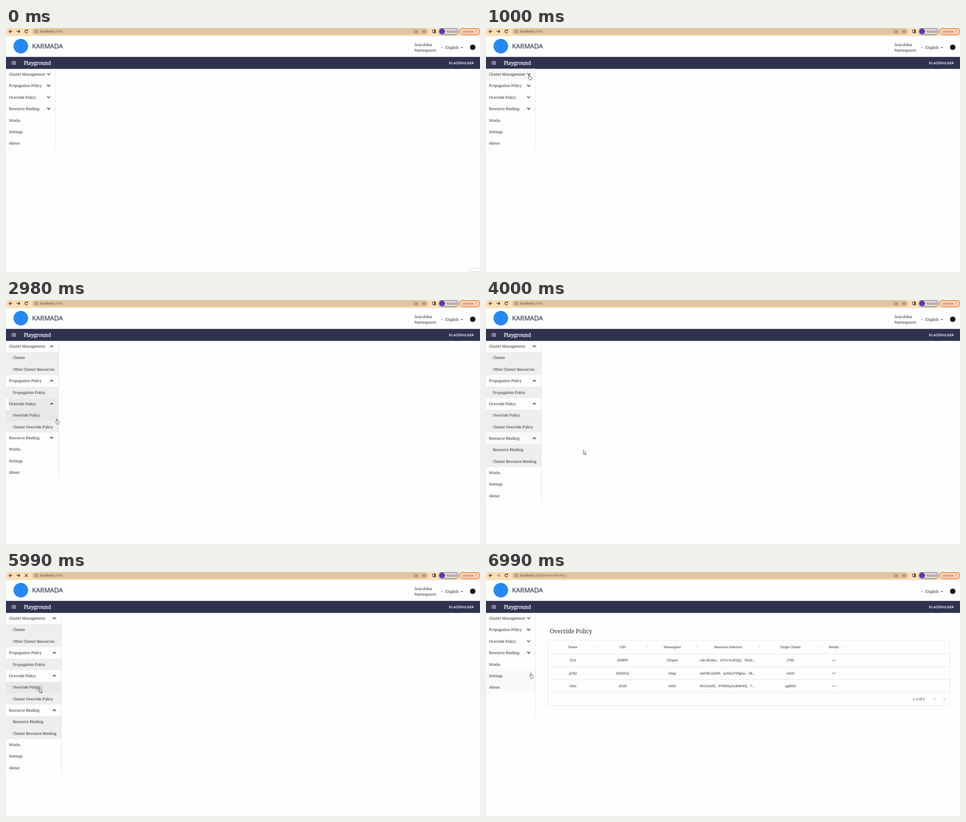
An HTML page that plays this animation: 1040 px wide and 538 px high, repeating every 7990 ms.

```html
<!DOCTYPE html>
<html lang="en">
<head>
<meta charset="utf-8">
<title>Playground</title>
<style>
  html, body { margin: 0; width: 100%; height: 100%; overflow: hidden; background: #fefefe; }
  svg { display: block; width: 1040px; height: 538px; overflow: hidden; }
  text { text-rendering: geometricPrecision; white-space: pre; }
  .slab { font-family: "Noto Serif", "Noto Sans CJK SC", "Noto Sans CJK", serif; letter-spacing: -.024em; fill: #2d3037; }
  .ui { font-family: "Open Sans", "Noto Sans", sans-serif; fill: #403a33; }
  .line { fill: none; stroke-linecap: round; stroke-linejoin: round; }
  #reel { animation: reel 7990ms step-end infinite; }
  @keyframes reel {
    0% { transform: translateY(0); }
    12.515% { transform: translateY(-600px); }
    24.78% { transform: translateY(-1200px); }
    37.296% { transform: translateY(-1800px); }
    50.062% { transform: translateY(-2400px); }
    62.452% { transform: translateY(-3000px); }
    74.968% { transform: translateY(-3600px); }
    87.484% { transform: translateY(-4200px); }
  }
</style>
</head>
<body>
<svg viewBox="0 0 1040 538" xmlns="http://www.w3.org/2000/svg">
  <!-- browser bar -->
  <rect width="1040" height="17" fill="#fedeb4"/>
  <rect y="17" width="1040" height="1" fill="#ece2d4"/>
  <rect x="57" y=".5" width="870" height="14.3" rx="7.1" fill="#dfc4a0"/>
  <g class="line" stroke="#333" stroke-width="1.3">
    <path d="M13.5 7.5H6.8M9.9 4.3 6.7 7.5 9.9 10.7"/>
    <g stroke="#5b5346" stroke-width=".8">
      <circle cx="66.5" cy="7.6" r="3.3"/>
      <path d="M66.5 7.2V9.3M66.5 5.7V5.8"/>
      <path d="M899 5.5H896.8V11H902.8V9.2M898.8 9Q899.3 6.6 902 6.5V4.7L904.2 7.2 902 9.3V7.8"/>
      <path d="M917.3 4 918.3 6.5 921 6.7 918.9 8.4 919.6 11 917.3 9.6 915 11 915.7 8.4 913.6 6.7 916.3 6.5Z"/>
    </g>
    <rect x="935.8" y="4.4" width="6.6" height="6.4" rx=".6" stroke-width="1.1"/>
    <path d="M941 5V10.5" stroke-width="2.6"/>
  </g>
  <rect x="949.5" y=".5" width="43" height="14.3" rx="7.1" fill="#e5d3c3" stroke="#4468b5"/>
  <circle cx="956.8" cy="7.5" r="6" fill="#4a2aa5"/>
  <text class="ui" x="955.6" y="10" font-size="7" style="fill:#fff">J</text>
  <text class="ui" x="967" y="9.9" font-size="6.6" style="fill:#3a57a0">Paused</text>
  <rect x="995.5" y=".5" width="44" height="14.3" rx="7.1" fill="#fbd3ad" stroke="#c25a36"/>
  <text class="ui" x="1002.5" y="9.9" font-size="6.6" style="fill:#a8401f">Update</text>
  <path d="M1032.7 4.8v.1M1032.7 7.5v.1M1032.7 10.2v.1" class="line" stroke="#b8603c" stroke-width="1.1"/>

  <!-- page header -->
  <circle cx="32.5" cy="40" r="16" fill="#2688ee"/>
  <text class="ui" x="57" y="45.4" font-size="14.3" style="fill:#2c3a58;text-shadow:1px 1px 1px #0004">KARMADA</text>
  <circle cx="957.3" cy="43.2" r="1" fill="#444"/>
  <text class="slab" x="964" y="46" font-size="8.7">English</text>
  <path d="M997 42h6l-3 3z" fill="#666"/>
  <circle cx="1024" cy="42.4" r="6" fill="#181818"/>
  <rect y="63" width="1040" height="1" fill="#c3c4cc"/>
  <rect y="64" width="1040" height="26.2" fill="#30334f"/>
  <path d="M12.3 74.4h9.8M12.3 77.2h9.8M12.3 80h9.8" stroke="#fff" stroke-width="1.1"/>
  <text class="slab" x="39" y="81.4" font-size="11.3" style="fill:#fff;stroke:#fff;stroke-width:.25">Playground</text>
  <text x="972" y="79.6" font-size="7.6" font-weight="500" fill="#fff" letter-spacing=".0286em" font-family="Roboto, sans-serif">PLACEHOLDER</text>

  <g id="reel"></g>
</svg>
<script>
const PITCH = 25.35, TOP = 89.7, GAP = 600;
const groups = [
  ["Cluster Management", "Cluster", "Other Cluster Resources"],
  ["Propagation Policy", "Propagation Policy"],
  ["Override Policy", "Override Policy", "Cluster Override Policy"],
  ["Resource Binding", "Resource Binding", "Cluster Resource Binding"],
  ["Works"], ["Settings"], ["About"]
];
const rowTop = i => TOP + PITCH * i;

const slab = (x, y, s, size = 8.4, anchor = "start") =>
  `<text class="slab" x="${x}" y="${y}" font-size="${size}" text-anchor="${anchor}">${s}</text>`;
const box = (x, y, w, h, fill) => `<rect x="${x}" y="${y}" width="${w}" height="${h}" fill="${fill}"/>`;
const line = (d, color, width = 1) => `<path class="line" d="${d}" stroke="${color}" stroke-width="${width}"/>`;

const pointer = (x, y, d) =>
  `<path transform="translate(${x} ${y})" d="${d}" fill="#fff" stroke="#2b2b2b" stroke-width=".8" stroke-linejoin="round"/>`;
const hand = (x, y) => pointer(x - 3.2, y,
  "M2.3 7.3V1.3a.9.9 0 0 1 1.8 0V5l3 .7q1.2.3 1.1 1.5v2q0 1-.7 2v1.1H3.2v-1L.6 8.3Q.2 7 1.2 6.8z");
const arrow = (x, y) => pointer(x, y, "M0 0V9.2L2.1 7.3 3.6 10.6 5 10 3.6 6.8H6.4z");

// open: number of expanded groups; tints: row index -> background; under: extra shapes behind the labels
function menu({ open = 0, width = 109, tints = {}, under = "", lag = 0, end }) {
  let back = "", front = "", row = 0;
  groups.forEach(([title, ...subs], g) => {
    const isOpen = g < open, y = () => rowTop(row) - (g >= open ? lag : 0);
    const tint = fill => { if (fill) back += box(0, y(), width, PITCH, fill); };
    tint(tints[row]);
    front += slab(6.6, y() + 15.4, title);
    if (subs.length) {
      const cx = width - 15.4, cy = y() + 12.2, k = isOpen ? -1.5 : 1.5;
      front += line(`M${cx - 2.9} ${cy - k}l2.9 ${2 * k} 2.9 ${-2 * k}`, "#222", 1.35);
    }
    row++;
    if (isOpen) for (const sub of subs) {
      tint(tints[row] || "#eee");
      front += slab(15, y() + 15.4, sub);
      row++;
    }
  });
  const bottom = end || rowTop(row) - lag - 1;
  return back + under + line(`M${width} 91V${bottom}`, "#e1e5e8") + front;
}

function bar({ path = "", loading = false, dim = false }) {
  const icon = loading
    ? "M41.7 4.8 47.3 10.4M47.3 4.8 41.7 10.4"
    : "M47.4 9.2A3.3 3.3 0 1 1 47 5.2M47.6 3.8V6H45.4";
  return line("M23.6 7.5H30.3M27.3 4.3 30.5 7.5 27.3 10.7", dim ? "#a39479" : "#333", 1.3) +
    line(icon, "#333", 1.25) +
    `<text class="ui" x="75" y="10.2" font-size="7.3">localhost<tspan fill="#6d6152">:3000${path}</tspan></text>`;
}

const links = slab(896, 40.2, "SearchBar") + slab(896, 52.3, "Namespaces");

const recordBox =
  `<rect x="1016.5" y="529.5" width="30" height="20" fill="#fff" stroke="#ddd"/>` +
  `<text class="ui" x="1020" y="540" font-size="7" style="fill:#bbb">Record</text>`;

function table() {
  const centers = [190.5, 300, 408.5, 531.5, 668, 763];
  const heads = ["Name", "UID", "Namespace", "Resource Selectors", "Target Cluster", "Details"];
  const rows = [
    ["YLIr", "KNB8Y", "ZtZquu", "c4s/cBLKar、wUrv/1uN2j2j、WaXi…", "270G"],
    ["g59Q", "IZkHE2y", "d4xp", "uM58t/c4o9H、qvkXs/FDYghn、5R…", "vAO2"],
    ["vhIn", "xFxH", "nMD", "8tO2/nhIX、FWRWqYu/R46Wlj、7…", "agBNSI"]
  ];
  const rule = "#dfe7e8", size = 7.35;
  let out = slab(140, 135.2, "Override Policy", 13.2) +
    `<rect x="136" y="150.3" width="881.8" height="144.2" rx="2" fill="none" stroke="${rule}"/>`;
  heads.forEach((h, i) => out += slab(centers[i], 168.3, h, 7.2, "middle"));
  for (const x of [245, 354, 463, 599.5, 736, 790]) out += line(`M${x} 162V169.5`, "#d6d9db");
  rows.forEach((cells, r) => {
    const y = 194.8 + 28.4 * r;
    out += line(`M136 ${y - 14.3}H1018`, rule);
    cells.forEach((c, i) => out += i === 3 ? slab(469, y + 2.5, c, size) : slab(centers[i], y + 2.5, c, size, "middle"));
    for (const x of [760.2, 763, 765.8]) out += `<circle cx="${x}" cy="${y}" r=".95" fill="#555"/>`;
  });
  return out + line("M136 265.7H1018", rule) + slab(936.5, 283.3, "1–3 of 3", size) +
    line("M985.2 277.8 982.6 280.4 985.2 283M1004.4 277.8 1007 280.4 1004.4 283", "#b5b8ba", 1.1);
}

const wide = { open: 4, width: 121.5 };
const pressed = `<path d="M4.5 ${rowTop(5)}Q5 230 7.8 ${rowTop(6)}H115.5V${rowTop(5)}z" fill="#e8e9ea"/>`;
const ripple = `<circle cx="73" cy="257" r="8" fill="#d0d3d6"/>`;

const scenes = [
  bar({}) + links + menu({}) + recordBox,
  bar({}) + links + menu({ tints: { 0: "#f6f6f6" } }) + hand(95, 102),
  bar({}) + links + menu({ open: 1, width: 115.5, tints: { 3: "#f6f6f6" } }) + hand(95.8, 178.6),
  bar({}) + links + menu({ open: 3, width: 115.5, tints: { 6: "#e7e8e9" }, under: pressed, lag: 1 }) + hand(111.5, 261.3),
  bar({}) + links + menu({ ...wide, tints: { 8: "#fafafa" } }) + arrow(213.8, 331.2),
  bar({}) + links + menu({ ...wide, tints: { 6: "#e7e8e9" } }) + hand(73.5, 256.5),
  bar({ loading: true }) + links + menu({ ...wide, tints: { 6: "#e7e8e9" }, under: ripple }) + arrow(73.8, 257),
  bar({ path: "/overridePolicy", dim: true }) + menu({ tints: { 5: "#f9f9f9", 6: "#fafafa" }, end: 321 }) + table() + hand(98.5, 222.3)
];
document.getElementById("reel").innerHTML =
  scenes.map((s, i) => `<g transform="translate(0 ${i * GAP})">${s}</g>`).join("");
</script>
</body>
</html>
```
